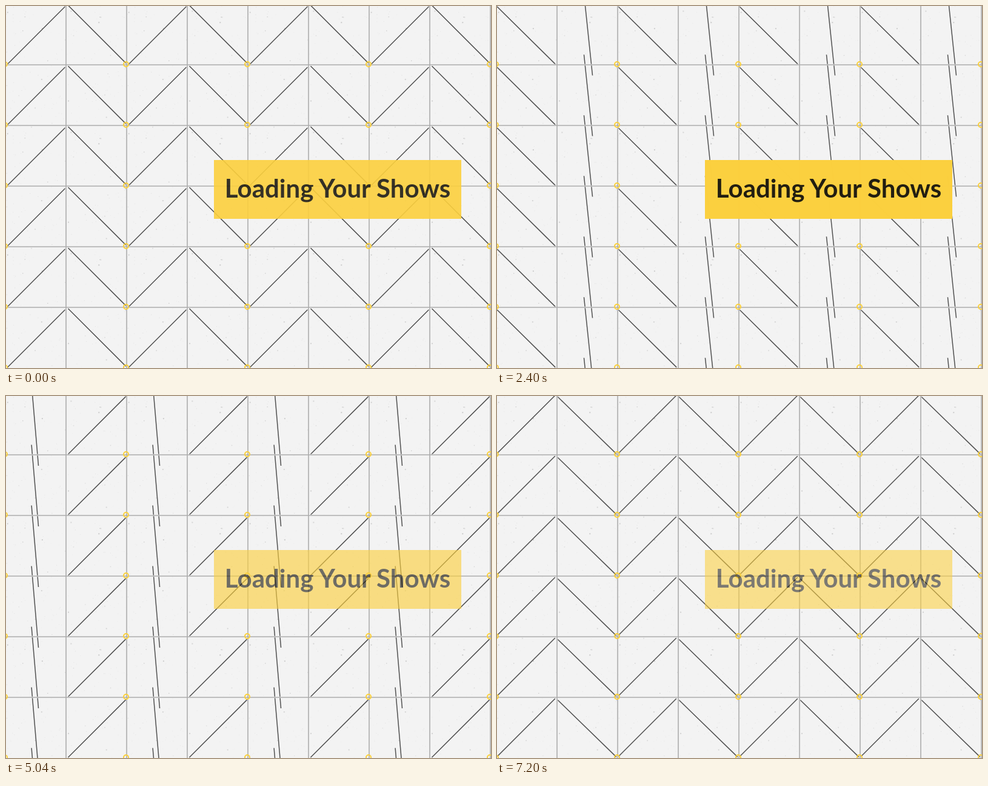
An HTML page with a canvas for the animation above (7280 ms loop, 800 px wide and 597 px high).

```html
<!DOCTYPE html>
<html lang="en">
<head>
<meta charset="utf-8">
<title>Loading</title>
<style>
  html, body { margin: 0; width: 100%; height: 100%; overflow: hidden; background: #f3f3f3; }
  canvas { position: absolute; left: 0; top: 0; display: block; }
  #label {
    position: absolute; left: 343px; top: 254px; width: 408px; height: 97px;
    background: #fcd03e; color: #211d10; text-align: center; white-space: nowrap;
    font: 700 42px/92px Lato, "Open Sans", sans-serif;
  }
</style>
</head>
<body>
<canvas id="stage" width="800" height="597"></canvas>
<div id="label">Loading Your Shows</div>
<script>
const W = 800, H = 597, LOOP = 7280, STEP = 80;
const ctx = document.getElementById('stage').getContext('2d');
const label = document.getElementById('label');

// Pauses in the stepping: [first still moment, last still moment]
const holds = [[800, 880], [3680, 3680], [4720, 4720], [5680, 5760], [6560, 6720]];

// Each bar makes two quarter turns per loop
const bars = [
  { x: 49, y: 47.6, angle: -45, shift: 1.2, turns: [[300, 2500], [3775, 6475]] },
  { x: 149.3, y: 47.5, angle: 45, shift: -1.2, turns: [[1270, 3720], [5040, 7360]] }
];

function makeLayer(draw) {
  const c = document.createElement('canvas');
  c.width = W;
  c.height = H;
  draw(c.getContext('2d'));
  return c;
}

function random(seed) {
  return () => (seed = (seed * 16807) % 2147483647) / 2147483647;
}

const paper = makeLayer(g => {
  const rnd = random(421);
  g.fillStyle = '#f3f3f3';
  g.fillRect(0, 0, W, H);
  for (let i = 0; i < 230; i++) {
    const x = rnd() * 200, y = rnd() * 200;
    const big = i < 26;
    const s = big ? 1 + rnd() : 0.6 + rnd() * 0.6;
    g.fillStyle = `rgba(90,90,90,${big ? 0.12 + rnd() * 0.2 : 0.04 + rnd() * 0.08})`;
    for (let tx = 0; tx < W; tx += 200)
      for (let ty = 0; ty < H; ty += 200) g.fillRect(tx + x, ty + y, s, s);
  }
});

const grid = makeLayer(g => {
  const rules = (width, color) => {
    g.lineWidth = width;
    g.strokeStyle = color;
    g.beginPath();
    for (let x = 99; x < W; x += 100) { g.moveTo(x, 0); g.lineTo(x, H); }
    for (let y = 97; y < H; y += 100) { g.moveTo(0, y); g.lineTo(W, y); }
    g.stroke();
  };
  rules(3, 'rgba(243,243,243,0.6)');
  rules(1.6, '#adadad');
  g.lineWidth = 2;
  g.strokeStyle = '#fad03c';
  for (let x = -2; x < W; x += 200)
    for (let y = 96; y < H; y += 100) {
      g.beginPath();
      g.arc(x, y, 4, 0, Math.PI * 2);
      g.stroke();
    }
});

// cubic-bezier(.42, 0, .58, 1)
function easeInOut(x) {
  if (x <= 0) return 0;
  if (x >= 1) return 1;
  let lo = 0, hi = 1, p;
  for (let i = 0; i < 20; i++) {
    p = (lo + hi) / 2;
    const q = 1 - p;
    if (1.26 * p * q * q + 1.74 * p * p * q + p * p * p < x) lo = p;
    else hi = p;
  }
  return p * p * (3 - 2 * p);
}

function drawBar(bar, t) {
  let deg = bar.angle;
  for (const [from, to] of bar.turns) deg += 90 * easeInOut((t - from) / (to - from));
  const a = deg * Math.PI / 180, c = Math.cos(a), s = Math.sin(a);
  const dx = c * 67.5, dy = s * 67.5;
  ctx.beginPath();
  for (let col = -1; col <= 4; col++)
    for (let row = 0; row <= 6; row++) {
      const x = bar.x + col * 200 - s * bar.shift;
      const y = bar.y + row * 100 + c * bar.shift;
      ctx.moveTo(x - dx, y - dy);
      ctx.lineTo(x + dx, y + dy);
    }
  ctx.stroke();
}

function stepped(t) {
  t = Math.floor(t / STEP) * STEP;
  const hold = holds.find(([a, b]) => t >= a && t <= b);
  return hold ? hold[0] - STEP : t;
}

function render(now) {
  const t = stepped(now % LOOP);
  ctx.drawImage(paper, 0, 0);
  ctx.lineWidth = 1.5;
  ctx.strokeStyle = '#505050';
  for (const bar of bars) drawBar(bar, t);
  ctx.drawImage(grid, 0, 0);
  label.style.opacity = 0.775 + 0.225 * Math.cos((t - 312) / 1000 * Math.PI);
}

const start = performance.now();
function tick() {
  render(performance.now() - start);
  requestAnimationFrame(tick);
}
tick();
</script>
</body>
</html>
```
